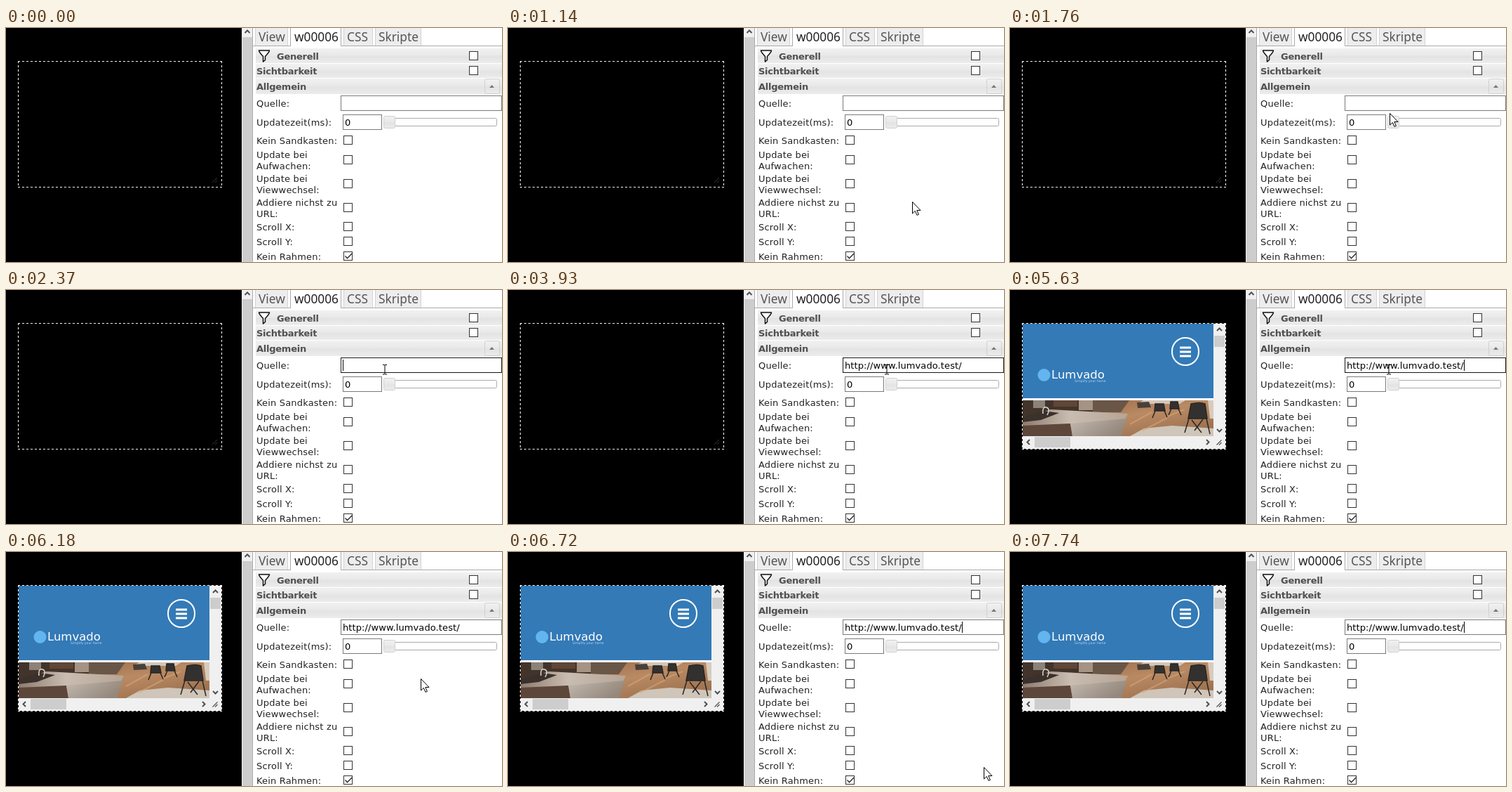
An HTML page that plays this animation: 707x333 px, repeating every 7.81 s.

```html
<!DOCTYPE html>
<html lang="de">
<head>
<meta charset="utf-8">
<title>Widget-Editor</title>
<style>
  html, body { margin: 0; width: 100%; height: 100%; overflow: hidden; background: #fff; }
  svg { display: block; width: 707px; height: 333px; }
  text { font: 13px "DejaVu Sans", sans-serif; fill: #222; }
  .label { letter-spacing: .18px; }
  .head { font-weight: bold; fill: #505050; letter-spacing: -.25px; }
  .tab { font: 17.3px "Noto Sans", sans-serif; fill: #555; }
  .tab.on { fill: #212121; }
  .logo { font-size: 16.5px; fill: #fff; }
  .claim { font-size: 4.6px; fill: #b9d3ea; }
  .box { fill: #fff; stroke: #333; }
  .input { fill: #fff; stroke: #7a7a7a; }
  .chev { fill: none; stroke: #505050; stroke-width: 2; }
</style>
</head>
<body>
<svg viewBox="0 0 707 333" xmlns="http://www.w3.org/2000/svg">
  <defs>
    <linearGradient id="bar" x2="0" y2="1">
      <stop stop-color="#f1f1f1"/><stop offset=".45" stop-color="#e9e9e9"/>
      <stop offset=".55" stop-color="#e3e3e3"/><stop offset="1" stop-color="#ececec"/>
    </linearGradient>
    <linearGradient id="floor" x2="1" y2="1">
      <stop stop-color="#8d6040"/><stop offset=".5" stop-color="#b98a63"/><stop offset="1" stop-color="#94694a"/>
    </linearGradient>
    <linearGradient id="counter" x2="1">
      <stop stop-color="#8d7b6e"/><stop offset=".45" stop-color="#c9bcb0"/><stop offset="1" stop-color="#b5a597"/>
    </linearGradient>
    <linearGradient id="front" x2="1" y2=".5">
      <stop stop-color="#c3bab0"/><stop offset="1" stop-color="#94877c"/>
    </linearGradient>
    <filter id="shadow" x="-30%" y="-30%" width="160%" height="160%">
      <feDropShadow dx="0" dy="1" stdDeviation="2.5" flood-opacity=".35"/>
    </filter>
    <clipPath id="photoClip"><rect x="18" y="157" width="272" height="51"/></clipPath>
  </defs>

  <rect width="336" height="333"/>
  <path d="M294 220l7-7M298 220l3-3" stroke="#333"/>

  <g id="page">
    <rect x="18" y="48" width="289" height="178" fill="#f0f0f0"/>
    <rect x="18" y="48" width="272" height="106" fill="#337ab7"/>
    <rect x="18" y="154" width="272" height="3" fill="#fff"/>
    <circle cx="48.500" cy="121" r="9" fill="#62b5ee"/>
    <text class="logo" x="59" y="126">Lumvado</text>
    <text class="claim" x="92" y="131">Simplify your home</text>
    <rect id="ring" y="68" height="39" fill="none" stroke="#fff" stroke-width="2"/>
    <path id="menu" d="M242 82h16M242 88h16M242 94h16" stroke="#fff" stroke-width="3"/>

    <g clip-path="url(#photoClip)">
      <rect x="18" y="157" width="272" height="51" fill="url(#floor)"/>
      <path d="M18 157h100v22l-100 8z" fill="#43342b"/>
      <path d="M33 157h17v11h-17z" fill="#8d8278"/>
      <path d="M62 157h34v9h-34z" fill="#5f4636"/>
      <path d="M98 157h20v14h-20z" fill="#a59383"/>
      <path d="M118 157h52l-12 17h-40z" fill="#6a5646"/>
      <path d="M190 157h60l-8 5h-60z" fill="#d4c7b8"/>
      <path d="M171 208l20-11 40-4 59 4v11z" fill="#cfc5b9"/>
      <path d="M18 183l40-13 110 6-4 8-78 7-68 3z" fill="url(#counter)"/>
      <path d="M18 181l30-9 22 3-26 10-26 3z" fill="#3a312c"/>
      <path d="M18 193l68-3 3 18h-71z" fill="#5d463a"/>
      <path d="M86 190l80-7-8 25h-69z" fill="url(#front)"/>
      <path d="M47 176q-1-11 5-9t1 11" fill="none" stroke="#d9d6d0" stroke-width="1.500"/>
      <path d="M171 191l31-17M189 200l35-18M224 180l25-10" stroke="#d8a675" stroke-width="2" opacity=".6"/>
      <g fill="#33312f" stroke="#292624" stroke-width="1.500">
        <path d="M258 162q13-3 20 0l3 21h-27zM207 162h12l2 10h-15zM229 159h10l2 10h-13z"/>
        <path d="M255 183l-6 20M280 183l5 22M259 185l14 18M275 184l-12 16M207 172l-4 10M220 172l4 9M230 169l-4 9M240 169l4 9" fill="none"/>
      </g>
      <path d="M181 160l17-1 3 8-19 1z" fill="#484039"/>
      <path d="M282 157h8v26h-5z" fill="#d7cbbd"/>
    </g>

    <rect x="291" y="65" width="15" height="16" fill="#cdcdcd"/>
    <rect x="35" y="209" width="51" height="15" fill="#cdcdcd"/>
    <path class="chev" d="M295 58l3.500-3.500 3.500 3.500M295 198l3.500 3.500 3.500-3.500M28 213l-3.500 3.500 3.500 3.500M280 213l3.500 3.500-3.500 3.500"/>
    <path d="M294.500 220.500l7-7M298 220.500l3.500-3.500" stroke="#555" stroke-width="1.300"/>
    <g id="loader">
      <rect x="134" y="107" width="40" height="40" rx="3" fill="#fff" filter="url(#shadow)"/>
      <g id="spokes" stroke-width="2" stroke-linecap="round"></g>
    </g>
  </g>
  <rect x="17.500" y="47.500" width="290" height="179" fill="none" stroke="#000"/>
  <path d="M17 47.500h291M17 226.500h291M17.500 47v180M307.500 47v180" stroke="#fff" stroke-dasharray="3 3"/>

  <rect x="336" width="16" height="333" fill="#f0f0f0"/>
  <rect x="337" y="13" width="14" height="320" fill="#cdcdcd"/>
  <path class="chev" d="M340.500 7l3.500-3.500 3.500 3.500"/>
  <rect x="352" width="355" height="333" fill="#fff"/>
  <path d="M351.500 0v333" stroke="#aaa"/>

  <path d="M352 25.500h355" stroke="#aaa"/>
  <g id="form"></g>
  <path d="M360.500 32h15q0 2-6 8.500v5l-3 2.500v-7.500q-6-6.500-6-8.500z" fill="#fff" stroke="#111" stroke-width="1.500" stroke-linejoin="round"/>
  <rect x="682.500" y="72.500" width="21" height="21" rx="2" fill="url(#bar)" stroke="#d0d0d0"/>
  <path d="M689 85l3.500-4 3.500 4z" fill="#777"/>

  <rect id="source" class="input" x="477.500" y="96.500" width="229" height="21"/>
  <text id="url" x="480" y="112" style="fill:#000; letter-spacing:.1px">http://www.lumvado.test/</text>
  <rect id="caret" y="99" width="1" height="16"/>
  <rect class="input" x="480.500" y="123.500" width="55" height="21"/>
  <text x="483" y="139" style="fill:#000">0</text>
  <rect x="540.500" y="128.500" width="159" height="11" rx="2" fill="#fff" stroke="#aaa"/>
  <rect id="knob" x="538.500" y="125.500" width="16" height="17" rx="2"/>
  <path d="M483.500 324.500l3 3.200 6.500-6.700" fill="none" stroke="#222" stroke-width="1.300"/>

  <path id="arrow" d="M.5.500v16.500l3.800-3.600 2.700 6 2.400-1-2.600-5.900h5.200z" fill="#fff" stroke="#000"/>
  <path id="beam" d="M-3-6.500h2.500l.5.500.5-.500h2.500M0-6v12.500M-3 7h2.500l.5-.500.5.500h2.500" fill="none" stroke="#000"/>
</svg>
<script>
const LOOP = 7810, STEP = 76.6;
const $ = id => document.getElementById(id);
const set = (id, attrs) => { for (const k in attrs) $(id).setAttribute(k, attrs[k]); };
const show = (id, on) => { $(id).style.display = on ? "" : "none"; };
const within = (t, spans) => spans.some(([a, b]) => t >= a && t < b);

const label = (x, y, str, cls = "label") => `<text class="${cls}" x="${x}" y="${y}">${str}</text>`;
const check = (x, y) => `<rect class="box" x="${x + .5}" y="${y + .5}" width="12" height="12"/>`;

function tab(x, w, tx, name, on) {
  const fill = on ? "#fff" : "#ededed", edge = on ? "#aaa" : "#d3d3d3", bottom = on ? 26 : 25;
  return `<path d="M${x + .5} ${bottom}V-1H${x + w - .5}V${bottom}" fill="${fill}" stroke="${edge}"/>`
    + label(tx, 19, name, on ? "tab on" : "tab");
}

function header(y, h, x, name, base) {
  return `<rect x="356" y="${y}" width="351" height="${h}" fill="url(#bar)"/>` + label(x, base, name, "head");
}

// A checkbox with one or two lines of text centred beside it
function row(y, ...lines) {
  const base = y + 20 - 8 * lines.length + (lines.length - 1) * 0;
  return check(481, y) + lines.map((str, i) => label(357, base + 16 * i, str)).join("");
}

$("form").innerHTML =
  tab(355, 47, 360, "View") + tab(405, 73, 411, "w00006", true)
  + tab(481, 42, 486, "CSS") + tab(526, 66, 531, "Skripte")
  + header(29, 21, 386, "Generell", 45) + header(51, 20, 357, "Sichtbarkeit", 66)
  + header(72, 22, 357, "Allgemein", 88) + check(660, 33) + check(660, 54)
  + label(357, 112, "Quelle:") + label(357, 139, "Updatezeit(ms):")
  + row(153, "Kein Sandkasten:")
  + row(181, "Update bei", "Aufwachen:")
  + row(215, "Update bei", "Viewwechsel:")
  + row(249, "Addiere nichst zu", "URL:")
  + row(276, "Scroll X:") + row(297, "Scroll Y:") + row(318, "Kein Rahmen:");

$("spokes").innerHTML = Array.from({ length: 12 }, (_, i) =>
  `<path d="M0-6v-5" transform="rotate(${i * 30})" stroke="#555" opacity="${.2 + i * .065}"/>`).join("");

// Keys: step number, x, y
const enter = [[0, 587, 320], [3, 581, 270], [7, 561, 178], [10, 546, 133], [11, 543, 126], [12, 541, 121]];
const leave = [[0, 545, 121], [3, 591, 180], [6, 637, 248], [10, 678, 306], [11, 675, 312], [13, 671, 328]];

function along(keys, s) {
  const end = keys[keys.length - 1];
  if (s >= end[0]) return end.slice(1);
  const i = keys.findIndex(k => k[0] > s), a = keys[i - 1], b = keys[i];
  const f = (s - a[0]) / (b[0] - a[0]);
  return [1, 2].map(n => Math.round(a[n] + (b[n] - a[n]) * f));
}

function pointer(t) {
  if (t < 830 || t >= 7020) return null;
  if (t >= 1910 && t < 5950) return { beam: true, at: t < 2220 ? [541, 117] : t < 2295 ? [541, 115] : [540, 113] };
  const [keys, start] = t < 1910 ? [enter, 830] : [leave, 5950];
  return { beam: false, at: along(keys, Math.floor((t - start) / STEP)) };
}

function draw(t) {
  const p = pointer(t);
  show("arrow", p && !p.beam);
  show("beam", p && p.beam);
  if (p) set(p.beam ? "beam" : "arrow", { transform: `translate(${p.at})` });

  const hot = within(t, [[1590, 1750]]);
  set("knob", { fill: hot ? "#dadada" : "url(#bar)", stroke: hot ? "#999" : "#d0d0d0" });
  $("source").style.stroke = p && p.beam ? "#171717" : "#7a7a7a";

  const typed = t >= 3530;
  show("url", typed);
  set("caret", { x: typed ? 647 : 480 });
  show("caret", within(t, [[2295, 2830], [3410, 3930], [4710, 5172], [5630, 6180], [6720, 7190], [7740, LOOP]]));

  show("page", t >= 4710);
  const step = Math.floor((t - 4710) / 77);
  const ready = step >= 1;
  show("menu", ready);
  set("ring", ready ? { x: 231, width: 38, rx: 19 } : { x: 234, width: 35, rx: 17.5 });
  show("loader", t < 5249);
  $("loader").style.opacity = Math.max(0, Math.min(1, (7 - step) / 3));
  set("spokes", { transform: `translate(154 127) rotate(${step * 30})` });
}

function tick() {
  draw(performance.now() % LOOP);
  requestAnimationFrame(tick);
}
tick();
</script>
</body>
</html>
```
